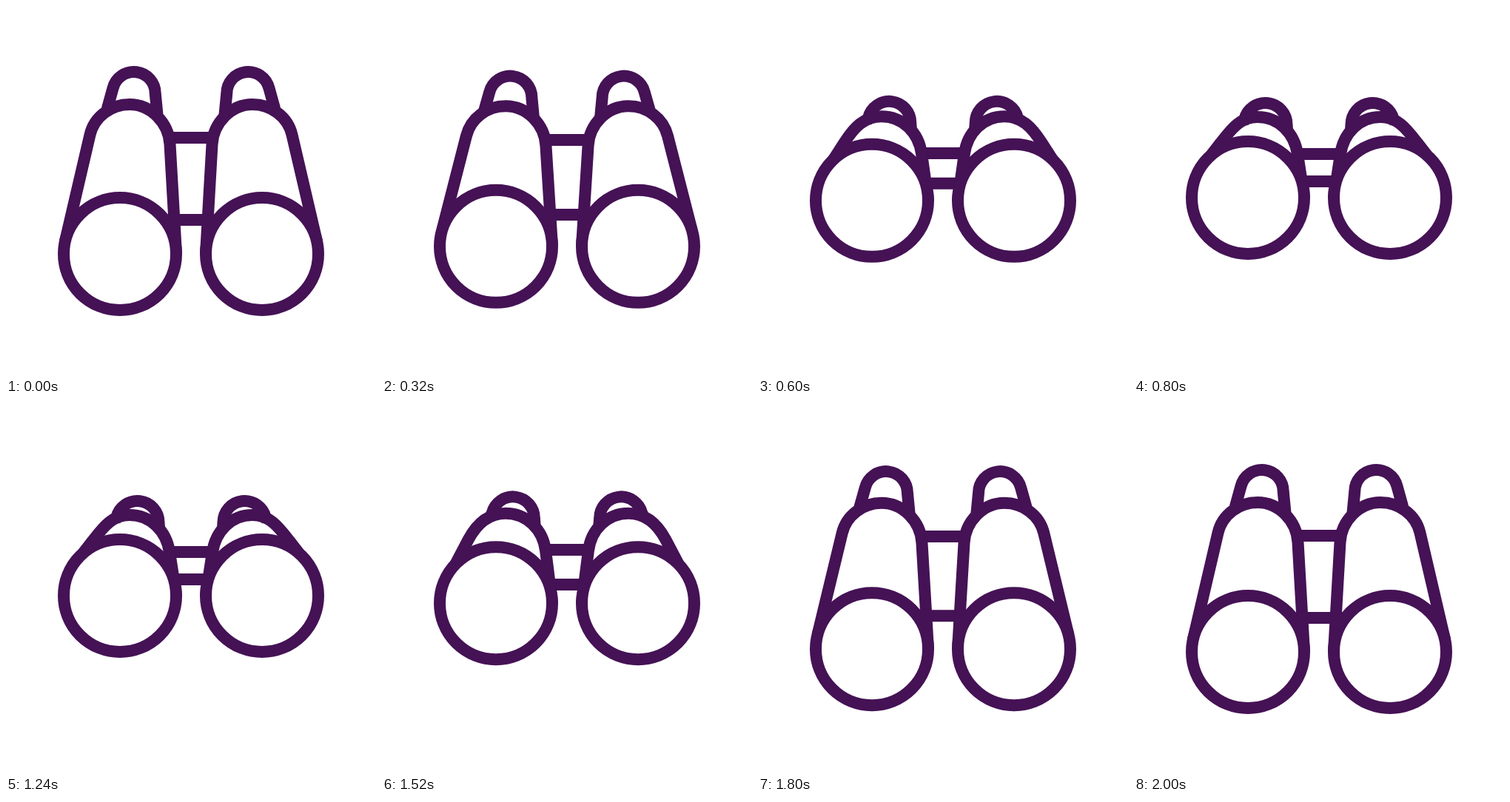
These frames come from a looping animation (500 px wide and 500 px high, 2200 ms). An HTML page:

```html
<!DOCTYPE html>
<html lang="en">
<head>
<meta charset="utf-8">
<title>Binoculars</title>
<style>
  html, body { margin: 0; width: 100%; height: 100%; overflow: hidden; background: #fff; }
  svg { display: block; width: 100%; height: 100%; }
  #icon { fill: none; stroke: #451255; stroke-width: 16; stroke-linejoin: round; }
</style>
</head>
<body>
<svg viewBox="0 0 500 500">
  <g id="icon">
    <path id="bridges"/>
    <g id="half">
      <path id="eyepiece"/>
      <path id="barrel"/>
      <circle id="lens" cx="154" r="76" fill="#fff"/>
    </g>
    <use href="#half" transform="matrix(-1 0 0 1 500 0)"/>
  </g>
</svg>
<script>
const LOOP = 2200, STEP = 40, MOVE = 600;
const FOLD_AT = 200, UNFOLD_AT = 1400;
const LENS_X = 154, LENS_R = 76, EYE_R = 29;

const byId = id => document.getElementById(id);
const setPath = (id, d) => byId(id).setAttribute('d', d);

// Point on the upper left of a circle, tilted up from its leftmost point.
function upperLeft(x, y, r, degrees) {
  const a = degrees * Math.PI / 180;
  return [x - r * Math.cos(a), y - r * Math.sin(a)];
}

// Bézier handles that lead from a straight side into a level apex.
function handles(foot, shoulder, apex, roundness) {
  const dx = shoulder[0] - foot[0], dy = shoulder[1] - foot[1];
  const reach = roundness * (apex[0] - shoulder[0]);
  const scale = Math.abs(reach) / Math.hypot(dx, dy);
  return [
    [shoulder[0] + dx * scale, shoulder[1] + dy * scale],
    [apex[0] - reach, apex[1]]
  ];
}

// Cubic Bézier easing (.46, 0, 0, 1), solved by bisection.
function ease(x) {
  if (x <= 0) return 0;
  if (x >= 1) return 1;
  let low = 0, high = 1, s;
  for (let i = 0; i < 24; i++) {
    s = (low + high) / 2;
    if (3 * (1 - s) ** 2 * s * 0.46 + s ** 3 < x) low = s;
    else high = s;
  }
  return s * s * (3 - 2 * s);
}

// fold: 0 is seen from above, 1 is seen from the front.
function drawPose(fold) {
  const mix = (open, folded) => open + (folded - open) * fold;
  const lensY = mix(335, 259);
  byId('lens').setAttribute('cy', lensY);

  const left = upperLeft(LENS_X, lensY, LENS_R, mix(12.5, 48.7));
  const right = [LENS_X + LENS_R, lensY];
  const leftShoulder = [mix(113.5, 117), mix(174, 185)];
  const rightShoulder = [mix(221.5, 221), mix(187, 200)];
  const apex = [167, mix(133, 150)];
  const [l1, l2] = handles(left, leftShoulder, apex, 0.47);
  const [r1, r2] = handles(right, rightShoulder, apex, 0.53);
  setPath('barrel', `M${left}L${leftShoulder}C${l1} ${l2} ${apex}` +
    `C${r2} ${r1} ${rightShoulder}L${right}`);

  const eyeX = mix(172.7, 177.5), eyeY = mix(118, 160);
  setPath('eyepiece', `M${mix(136.8, 147)} ${mix(139, 158)}` +
    `L${upperLeft(eyeX, eyeY, EYE_R, 14)}` +
    `A${EYE_R} ${EYE_R} 0 0 1 ${eyeX + EYE_R} ${eyeY}` +
    `L${mix(204.5, 207)} ${mix(147, 168)}`);

  setPath('bridges', `M224 ${mix(178, 200)}H276M228 ${mix(289, 237)}H272`);
}

function draw(time) {
  const t = Math.floor((time % LOOP) / STEP) * STEP;
  drawPose(ease((t - FOLD_AT) / MOVE) - ease((t - UNFOLD_AT) / MOVE));
}

let start;
function tick(now) {
  start ??= now;
  draw(now - start);
  requestAnimationFrame(tick);
}
draw(0);
requestAnimationFrame(tick);
</script>
</body>
</html>
```
